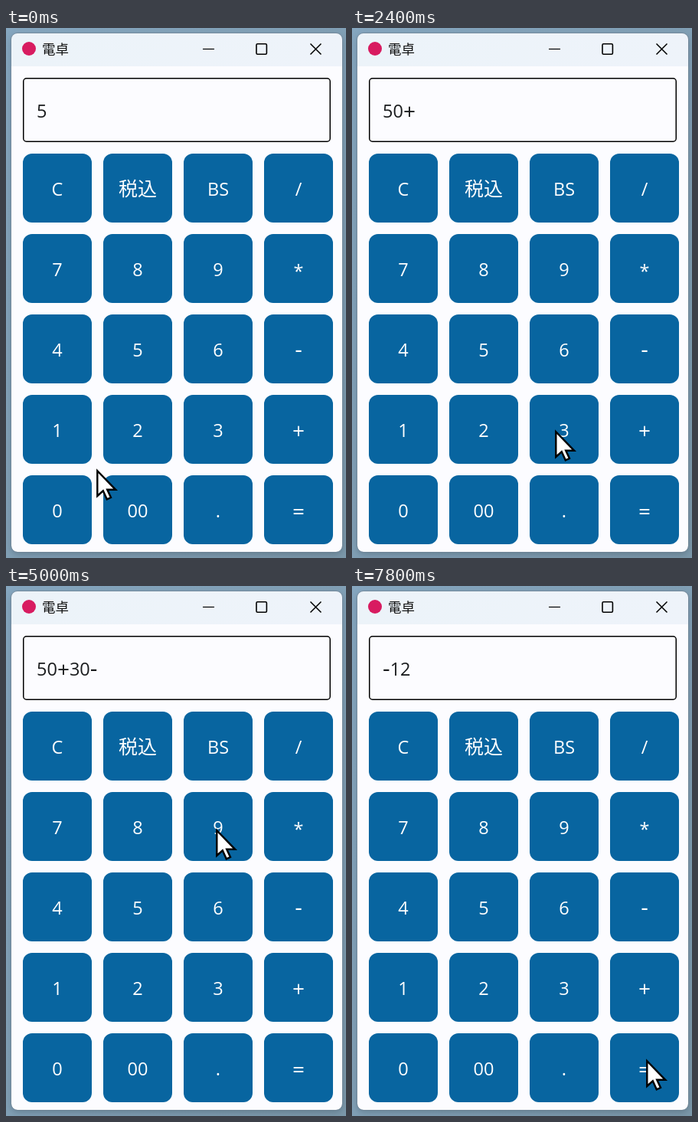
Animation, 444 px wide and 692 px high, one loop 8000 ms. Source, as an HTML page:

```html
<!DOCTYPE html>
<html lang="ja">
<head>
<meta charset="utf-8">
<title>電卓</title>
<style>
  html, body { margin: 0; width: 100%; height: 100%; overflow: hidden; background: #7f9db2; }
  svg { display: block; width: 100vw; height: 100vh; }
  text { font-family: "Open Sans", "Noto Sans", "Noto Sans CJK JP", "Noto Sans CJK", sans-serif; font-size: 23.5px; white-space: pre; }
  .key { fill: #fff; text-anchor: middle; }
  .cjk { font-family: "Noto Sans CJK JP", "Noto Sans CJK", sans-serif; }
</style>
</head>
<body>
<svg id="stage" viewBox="0 0 444 692">
  <defs>
    <linearGradient id="desk" x1="0" y1="0" x2="1" y2="1">
      <stop offset="0" stop-color="#86a7c0"/>
      <stop offset="1" stop-color="#7c98aa"/>
    </linearGradient>
    <linearGradient id="bar">
      <stop offset="0" stop-color="#ecf3f9"/>
      <stop offset="1" stop-color="#eef3fa"/>
    </linearGradient>
    <filter id="shade" x="-10%" y="-10%" width="120%" height="120%">
      <feGaussianBlur stdDeviation="5"/>
    </filter>
    <clipPath id="frame"><rect x="7" y="7" width="432" height="677" rx="8"/></clipPath>
  </defs>
  <rect width="444" height="692" fill="url(#desk)"/>
  <rect x="7" y="10" width="432" height="677" rx="8" fill="#2f4250" opacity=".35" filter="url(#shade)"/>
  <g clip-path="url(#frame)">
    <rect x="7" y="7" width="432" height="677" fill="#fcfcff"/>
    <rect x="7" y="7" width="432" height="43" fill="url(#bar)"/>
  </g>
  <rect x="6.5" y="6.5" width="433" height="678" rx="8.5" fill="none" stroke="#6f8494" stroke-opacity=".7"/>
  <circle cx="30" cy="27" r="9" fill="#d81b60"/>
  <text class="cjk" x="47" y="33.5" style="font-size:17.5px" fill="#111">電卓</text>
  <g fill="none" stroke="#000" stroke-width="1.6">
    <path d="M257 27.5H272" stroke-width="1.2"/>
    <rect x="327" y="20.8" width="13.4" height="13.4" rx="1.5"/>
    <path d="M397.5 20.5L411.5 34.5M411.5 20.5L397.5 34.5" stroke-width="1.5"/>
    <rect x="22.75" y="65.75" width="400.5" height="82.5" rx="4" stroke-width="1.5"/>
  </g>
  <text id="out" x="40" y="117.3" fill="#1a1c1e"></text>
  <g id="keys"></g>
  <path id="cursor" d="M1.3 3.2V36L8.8 29.3L13.8 40.3L19 38L14.2 27.8H25.2Z"
        fill="#fff" stroke="#000" stroke-width="2.4"/>
</svg>
<script>
const NS = 'http://www.w3.org/2000/svg';
const LOOP = 8000, STEP = 200;
const BLUE = '#0865a0', LIT = '#176ca6';
const LABELS = ['C', '税込', 'BS', '/', '7', '8', '9', '*', '4', '5', '6', '-',
                '1', '2', '3', '+', '0', '00', '.', '='];
// operator: [font size, baseline shift]
const OPS = { '+': [28, 1.5], '=': [28, 1.5], '-': [30, 1], '*': [23.5, 2] };

// time, x, y of the pointer tip
const PATH = [
  [0, 118, 575], [400, 76, 610], [600, 76, 610], [1000, 380, 483], [1200, 384, 494],
  [1800, 384, 494], [2400, 265, 524], [2700, 264, 525], [3200, 80, 614], [3500, 78, 615],
  [4000, 370, 379], [4200, 369, 377], [4500, 369, 377], [5000, 274, 316], [5400, 274, 316],
  [6000, 170, 533], [6500, 170, 533], [7200, 384, 617], [8000, 384, 617]
];
// time, display, key pressed, length of the highlight
const PRESSES = [
  [0, '5', '5', 0], [400, '50', '0', 200], [1400, '50+', '+', 200], [2600, '50+3', '3', 200],
  [3400, '50+30', '0', 200], [4200, '50+30-', '-', 200], [5200, '50+30-9', '9', 200],
  [6200, '50+30-92', '2', 200], [7400, '-12', '=', 200]
];

const byId = id => document.getElementById(id);
const out = byId('out'), cursor = byId('cursor'), keys = {};

function add(parent, tag, attrs) {
  const el = document.createElementNS(NS, tag);
  for (const k in attrs) el.setAttribute(k, attrs[k]);
  return parent.appendChild(el);
}

function setText(el, str) {
  el.textContent = '';
  let shift = 0;
  for (const ch of str) {
    const [size, dy] = OPS[ch] || [23.5, 0];
    const span = add(el, 'tspan', { dy: dy - shift, style: `font-size:${size}px` });
    span.textContent = ch;
    shift = dy;
  }
}

LABELS.forEach((label, i) => {
  const x = 22 + i % 4 * 105, y = 164 + Math.floor(i / 4) * 105;
  const g = byId('keys');
  keys[label] = add(g, 'rect', { x, y, width: 90, height: 90, rx: 12, fill: BLUE });
  const text = add(g, 'text', { x: x + 45, y: y + 55, class: 'key' });
  if (label === '税込') {
    text.classList.add('cjk');
    text.style.fontSize = '25px';
    text.textContent = label;
  } else setText(text, label);
});

function pointer(t) {
  const i = Math.max(1, PATH.findIndex(p => p[0] >= t));
  const [t0, x0, y0] = PATH[i - 1], [t1, x1, y1] = PATH[i];
  const u = (t - t0) / (t1 - t0), e = u * u * (3 - 2 * u);
  return [x0 + (x1 - x0) * e, y0 + (y1 - y0) * e];
}

let shown = null;
function render(ms) {
  const t = Math.floor(ms % LOOP / STEP) * STEP;
  const [start, str, key, glow] = PRESSES.filter(p => p[0] <= t).pop();
  if (str !== shown) setText(out, shown = str);
  for (const k in keys) keys[k].setAttribute('fill', k === key && t < start + glow ? LIT : BLUE);
  cursor.setAttribute('transform', `translate(${pointer(t)})`);
}

const begin = performance.now();
function tick() {
  render(performance.now() - begin);
  requestAnimationFrame(tick);
}
tick();
</script>
</body>
</html>
```
